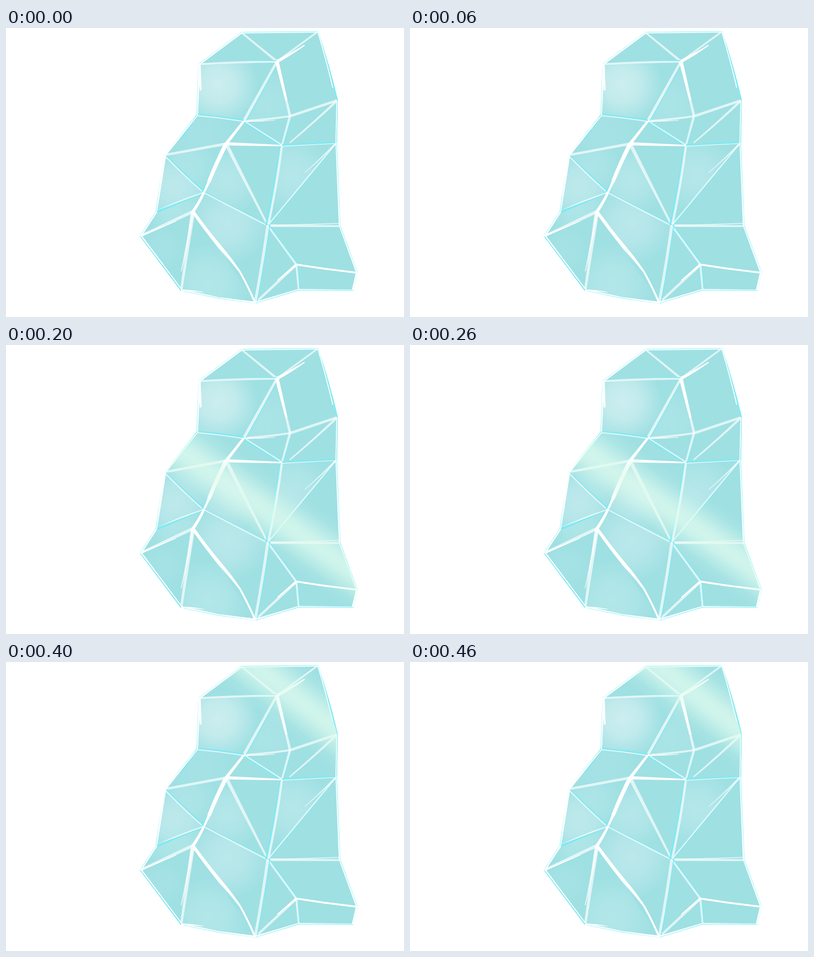
An HTML page for the animation above (500 ms loop, 877 by 639 pixels).

```html
<!DOCTYPE html>
<html lang="en">
<head>
<meta charset="utf-8">
<title>Ice crystal</title>
<style>
html, body { margin: 0; width: 100%; height: 100%; overflow: hidden; background: #fff; }
svg { display: block; width: 877px; height: 639px; }
.glint { transform-origin: 0 0; animation: glint .5s step-end infinite; }
@keyframes glint {
  0% { opacity: 0; transform: translate(460px, 488px) rotate(33deg); }
  20% { opacity: 1; transform: translate(460px, 488px) rotate(33deg); }
  40% { opacity: 1; transform: translate(580px, 371px) rotate(35deg); }
  60% { opacity: 1; transform: translate(590px, 220px) rotate(37deg); }
  80%, 100% { opacity: 1; transform: translate(645px, 85px) rotate(38deg); }
}
</style>
</head>
<body>
<svg viewBox="0 0 877 639">
  <defs>
    <clipPath id="body"><path id="shape"/></clipPath>
    <linearGradient id="band" x1="0" y1="0" x2="0" y2="1">
      <stop offset="0" stop-color="#e0fbee" stop-opacity="0"/>
      <stop offset=".16" stop-color="#e0fbee" stop-opacity=".13"/>
      <stop offset=".4" stop-color="#e0fbee" stop-opacity=".68"/>
      <stop offset=".5" stop-color="#e0fbee" stop-opacity=".76"/>
      <stop offset=".6" stop-color="#e0fbee" stop-opacity=".68"/>
      <stop offset=".84" stop-color="#e0fbee" stop-opacity=".13"/>
      <stop offset="1" stop-color="#e0fbee" stop-opacity="0"/>
    </linearGradient>
  </defs>
  <use href="#shape" fill="#9fe0e3"/>
  <g id="facets"></g>
  <use href="#shape" fill="none" stroke="#8cf4fc" stroke-width="2.5" stroke-linejoin="round"/>
  <g id="pale" fill="#fff" fill-opacity=".68"></g>
  <g id="cyan" fill="#7deaf3"></g>
  <g id="white" fill="#fff"></g>
  <g clip-path="url(#body)">
    <rect class="glint" x="-500" y="-78" width="1000" height="156" fill="url(#band)"/>
  </g>
</svg>
<script>
const $ = id => document.getElementById(id);

// Upper case: corners of the crystal; lower case: loose stroke ends.
const points = {
  A: [519, 10], B: [687, 8], C: [425, 80], D: [597, 74], E: [421, 193], F: [524, 206],
  G: [626, 195], H: [730, 160], I: [485, 256], J: [608, 260], K: [728, 254], L: [349, 281],
  M: [436, 364], N: [331, 406], O: [412, 406], P: [296, 460], Q: [577, 437], R: [736, 438],
  S: [640, 523], T: [774, 541], U: [765, 580], V: [645, 579], W: [549, 608], X: [386, 580],
  a: [658, 38], b: [618, 161], c: [592, 204], d: [625, 254], e: [447, 340], f: [386, 538],
  g: [473, 486], h: [516, 540], i: [658, 320], j: [720, 132], k: [428, 138], l: [385, 245],
  m: [530, 74], p: [735, 432], q: [598, 558], s: [375, 427], t: [435, 584], u: [468, 597]
};

const outline = 'ABHKRTUVWuXPNLEC';
const polygon = names => 'M' + [...names].map(n => points[n].join(' ')).join('L') + 'Z';
$('shape').setAttribute('d', polygon(outline));

// Facet with a soft round light in it.
function facet(names, x, y, r, color) {
  const id = 'soft' + names;
  $('facets').insertAdjacentHTML('beforeend', `
    <radialGradient id="${id}" gradientUnits="userSpaceOnUse" cx="${x}" cy="${y}" r="${r}">
      <stop offset="0" stop-color="${color}"/>
      <stop offset=".45" stop-color="${color}" stop-opacity=".75"/>
      <stop offset="1" stop-color="${color}" stop-opacity="0"/>
    </radialGradient>
    <path d="${polygon(names)}" fill="url(#${id})"/>`);
}

facet('CDFE', 468, 126, 88, '#cdeeef');
facet('DGF', 575, 170, 85, '#aae4e7');
facet('EFIL', 430, 235, 75, '#a5e2e5');
facet('LMN', 372, 350, 80, '#bee9ec');
facet('LIM', 400, 305, 65, '#ade5e8');
facet('IQM', 486, 338, 78, '#b5e7ea');
facet('MQWO', 488, 432, 92, '#bbe8eb');
facet('JKQ', 632, 325, 85, '#b5e7ea');
facet('OWX', 446, 565, 90, '#b3e7e9');
facet('NMOP', 372, 400, 65, '#afe6e8');
facet('OXP', 345, 490, 50, '#a5e2e5');

// Brush stroke: "<from><to> startWidth endWidth bow shift"
function brush(spec) {
  const [ends, w1, w2, bow = 0, shift = 0] = spec.split(' ');
  const [[x1, y1], [x2, y2]] = [...ends].map(n => points[n]);
  const len = Math.hypot(x2 - x1, y2 - y1);
  const nx = (y1 - y2) / len, ny = (x2 - x1) / len;
  const at = (x, y, off) => `${(x + nx * off).toFixed(1)} ${(y + ny * off).toFixed(1)}`;
  const mx = (x1 + x2) / 2, my = (y1 + y2) / 2;
  const a = w1 / 2, b = w2 / 2, m = (a + b) / 2, s = +shift, c = s + 2 * bow;
  return `M${at(x1, y1, s + a)}Q${at(mx, my, c + m)} ${at(x2, y2, s + b)}` +
    `L${at(x2, y2, s - b)}Q${at(mx, my, c - m)} ${at(x1, y1, s - a)}Z`;
}

function paint(layer, specs) {
  $(layer).innerHTML = specs.trim().split(/\s*,\s*/)
    .map(s => `<path d="${brush(s)}"/>`).join('');
}

paint('pale', `
  AD 4 5, BD 4 4, CD 4 5 -1, DF 5 7, EF 4 4 -1, FG 5 4 1, bG 5 6, GJ 6 4, FJ 4 5,
  GH 6 5, Hd 5 3 -1, JK 3 2 0 1, IL 6 5, IQ 8 4, JQ 5 6 -2, KQ 3 4, Ki 4 1 -1,
  QR 6 4, Qp 2 2, LM 4 4 1, MN 3 3 2, MQ 3 4, OP 7 5, OX 9 5, Of 6 2 -1,
  QS 4 5, QW 7 6 -1, SV 5 4, SW 6 5`);

paint('cyan', `
  BH 2 3 -2, mD 1 2 0 -2, EF 3 3 -1 -2, FJ 3 3 0 2, JK 3 3 0 -1, JQ 2 4 -2 4, KQ 1 2 0 -2,
  LM 2 3 1 -2, MN 1 5 0 -1, MQ 1 2 0 -2, QS 2 2 0 -3, QW 2 2 -1 -4, SV 2 2 0 -3,
  El 4 3, GJ 1 2 0 -3, HK 2 3, LN 2 3 0 -1, XP 3 2, WV 2 2, DF 1 2 0 -4, eM 1 3 0 4`);

paint('white', `
  AB 2 2 0 1, Bj 2 2 -1, HK 2 2 0 1, KR 2 3 0 1, RT 2 3 0 1, TU 4 4 0 1, UV 1 2 0 1,
  VW 2 3 0 1, Wu 4 2 0 1, uX 2 3 0 1, Xt 4 1 -1, XP 2 3 0 2, PN 3 3 0 1, NL 2 6 0 1,
  LE 5 2 0 1, EC 2 4 0 1, Ck 6 4 0 -1, CA 3 3 0 1, Da 7 2 1, Db 8 5, FI 5 7,
  Ie 9 8 1, eM 6 4, MO 5 7 -1, Fc 2 1 1, IJ 7 3, Ps 4 1,
  Og 7 8 1, gh 8 4 -1, hW 4 4 -1, ST 4 4 1, Sq 5 2`);
</script>
</body>
</html>
```
